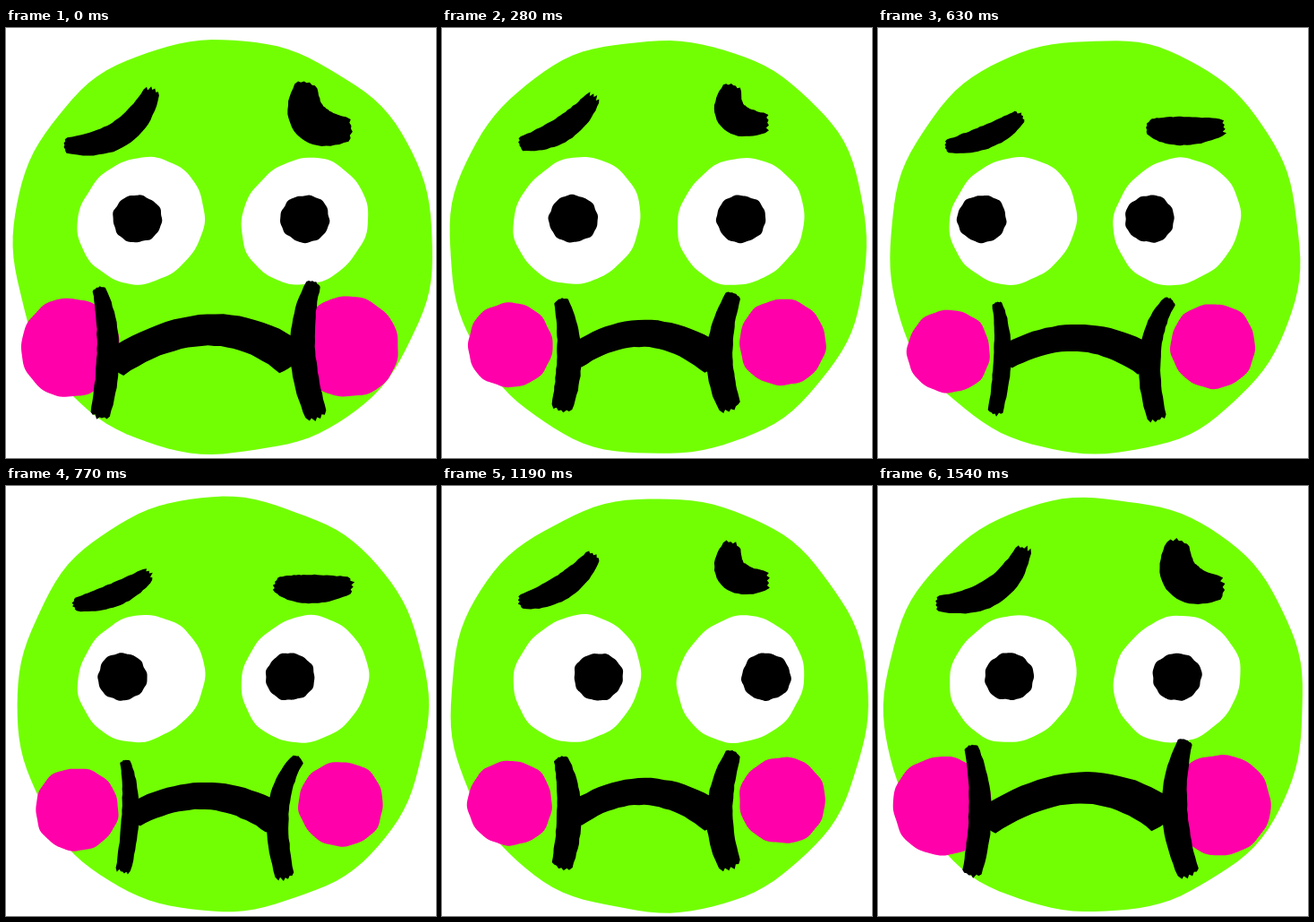
Write an HTML page with a canvas that moves like this. It is 480 px wide and 480 px high and loops after 1.61 s.

```html
<!DOCTYPE html>
<html lang="en">
<head>
<meta charset="utf-8">
<title>Queasy face</title>
<style>
  html, body { margin: 0; width: 100%; height: 100%; overflow: hidden; background: #fff; }
  canvas { display: block; width: 480px; height: 480px; }
</style>
</head>
<body>
<canvas id="stage" width="480" height="480"></canvas>
<script>
const ctx = document.getElementById('stage').getContext('2d');
const STEP = 70, COUNT = 23;
const GREEN = '#72ff03', PINK = '#ff00aa', WHITE = '#fff', BLACK = '#000';

// Strokes: start, middle and end point, then half width. Cheeks: centre and radius.
const strained = {
  head: [234],
  cheekL: [72, 357, 55], cheekR: [382, 356, 56],
  browL: [68, 131, 127, 118, 162, 72, 15], browR: [335, 65, 341, 104, 381, 113, 22],
  barL: [104, 292, 114, 358, 105, 431, 12.5], barR: [343, 286, 331, 356, 346, 431, 14],
  arch: [122, 374, 225, 337, 318, 368, 18]
};
const uneasy = {
  head: [233],
  cheekL: [76, 354, 47], cheekR: [380, 351, 48],
  browL: [89, 129, 134, 113, 168, 79, 14], browR: [324, 67, 325, 98, 360, 106, 18],
  barL: [133, 305, 142, 362, 134, 423, 13.5], barR: [325, 299, 310, 362, 321, 422, 14.5],
  arch: [148, 367, 226, 341, 304, 370, 15.5]
};
const flat = {
  head: [229],
  cheekL: [79, 361, 46], cheekR: [374, 355, 47],
  browL: [78, 132, 122, 121, 158, 99, 13], browR: [303, 110, 338, 115, 383, 111, 16],
  barL: [133, 308, 139, 362, 131, 428, 9.5], barR: [326, 305, 304, 360, 311, 434, 12],
  arch: [143, 367, 223, 346, 300, 371, 15.5]
};
const MOODS = [
  [0, strained], [4, uneasy], [7, flat], [11, flat],
  [13, uneasy], [17, uneasy], [22, strained], [23, strained]
];

// Relative width at the start, middle and end of a stroke.
const BROW = [0.58, 1, 0.62], BAR = [0.6, 1, 0.88], ARCH = [0.92, 0.97, 1.18];

function poseAt(step) {
  let i = 0;
  while (step >= MOODS[i + 1][0]) i++;
  const [[from, a], [to, b]] = MOODS.slice(i, i + 2);
  const k = (step - from) / (to - from), pose = {};
  for (const part in a) pose[part] = a[part].map((v, j) => v + (b[part][j] - v) * k);
  return pose;
}

function ramp(step, from, to) {
  const t = Math.max(0, Math.min(1, (step - from) / (to - from)));
  return t * t * t * (t * (6 * t - 15) + 10);
}

// Look ahead, left, right and ahead again.
function gazeAt(step) {
  return -30.5 * ramp(step, 4, 7) + 66 * ramp(step, 10, 13) - 35.5 * ramp(step, 16, 19);
}

let seed = 1;
function rand() {
  seed = (Math.imul(seed, 1664525) + 1013904223) >>> 0;
  return seed / 4294967296;
}
const jitter = size => (rand() * 2 - 1) * size;

function fillPath(pts, color) {
  ctx.beginPath();
  pts.forEach(p => ctx.lineTo(...p));
  ctx.fillStyle = color;
  ctx.fill();
}

// Hand-drawn ellipse, a little square, with a slow wobble along its edge.
function blob(x, y, rx, ry, color, { tilt = 0, wobble = 0.7 } = {}) {
  const waves = [3, 5, 8, 13].map(n => [n, rand() * 2 * Math.PI]);
  const pts = [];
  for (let i = 0; i < 120; i++) {
    const a = i * Math.PI / 60;
    const square = 1 + 0.014 * Math.sin(2 * a) ** 2;
    const edge = waves.reduce((sum, [n, phase]) => sum + Math.sin(n * a + phase), 0) * wobble / 2;
    const px = (rx * square + edge) * Math.cos(a), py = (ry * square + edge) * Math.sin(a);
    pts.push([
      x + px * Math.cos(tilt) - py * Math.sin(tilt),
      y + px * Math.sin(tilt) + py * Math.cos(tilt)
    ]);
  }
  fillPath(pts, color);
}

// Quadratic curve passing through b halfway.
function through(a, b, c, t) {
  const ctrl = 2 * b - (a + c) / 2, u = 1 - t;
  return u * u * a + 2 * u * t * ctrl + t * t * c;
}

// Brush stroke with bulged, frayed ends.
function stroke([x0, y0, x1, y1, x2, y2, width], profile, frayStart, frayEnd) {
  const N = 24, left = [], right = [];
  const point = t => [through(x0, x1, x2, t), through(y0, y1, y2, t)];
  const heading = t => {
    const [ax, ay] = point(t - 0.01), [bx, by] = point(t + 0.01);
    const len = Math.hypot(bx - ax, by - ay);
    return [(bx - ax) / len, (by - ay) / len];
  };
  for (let i = 0; i <= N; i++) {
    const t = i / N, [x, y] = point(t), [dx, dy] = heading(t);
    const r = width * through(...profile, t);
    const l = r + jitter(0.4), m = r + jitter(0.4);
    left.push([x + dy * l, y - dx * l]);
    right.unshift([x - dy * m, y + dx * m]);
  }
  const cap = (from, to, t, sign, fray) => {
    const [dx, dy] = heading(t), bulge = width * profile[2 * t] * 0.35, pts = [];
    for (let k = 1; k < 8; k++) {
      const u = k / 8;
      const out = sign * (bulge * Math.sin(Math.PI * u) + (k % 2 ? 1 : -0.4) * rand() * fray);
      pts.push([from[0] + (to[0] - from[0]) * u + dx * out, from[1] + (to[1] - from[1]) * u + dy * out]);
    }
    return pts;
  };
  fillPath([
    ...left, ...cap(left[N], right[0], 1, 1, frayEnd),
    ...right, ...cap(right[N], left[0], 0, -1, frayStart)
  ], BLACK);
}

function draw(step) {
  const pose = poseAt(step), gaze = gazeAt(step);
  seed = 7919 * (step + 1);
  ctx.fillStyle = WHITE;
  ctx.fillRect(0, 0, 480, 480);

  blob(242, 244.5, pose.head[0], 231, GREEN, { wobble: 1.6 });
  for (const [x, y, r] of [pose.cheekL, pose.cheekR]) blob(x, y, r, r, PINK);
  for (const [x, y] of [[151, 215], [333.5, 216]]) blob(x, y, 73, 67, WHITE, { tilt: -Math.PI / 4 });
  for (const x of [146.5, 333.8]) blob(x + gaze, 213, 27.3, 26.3, BLACK);

  stroke(pose.browL, BROW, 2, 4);
  stroke(pose.browR, BROW, 2.5, 4);
  stroke(pose.arch, ARCH, 0, 0);
  stroke(pose.barL, BAR, 1, 3.5);
  stroke(pose.barR, BAR, 1, 3.5);
}

let shown = -1;
function tick(now) {
  const step = Math.floor(now / STEP) % COUNT;
  if (step !== shown) draw(shown = step);
  requestAnimationFrame(tick);
}
tick(performance.now());
</script>
</body>
</html>
```
